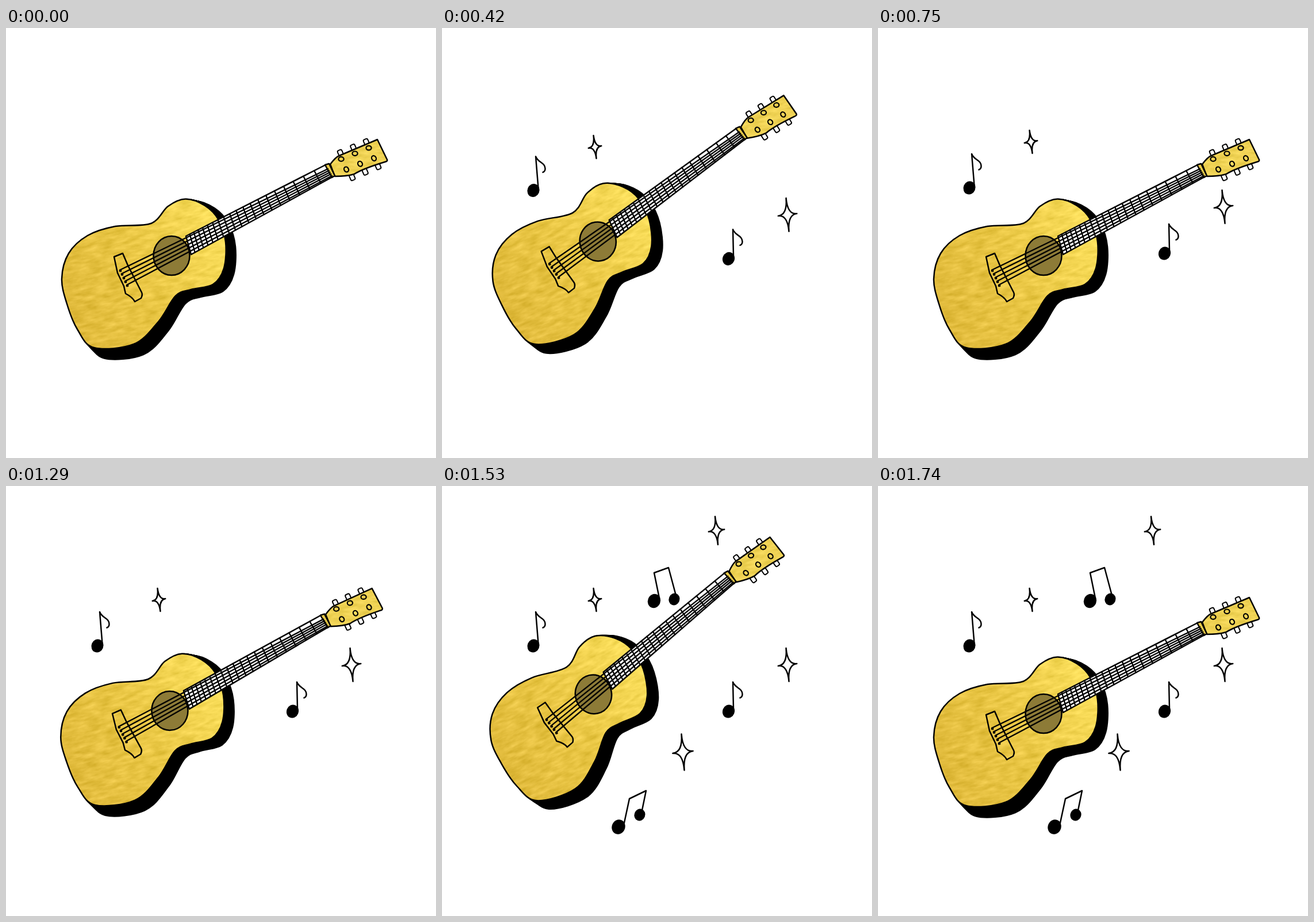
These frames come from a looping animation (748x748 px, 2280 ms). An HTML page:

```html
<!DOCTYPE html>
<html lang="en">
<head>
<meta charset="utf-8">
<title>Guitar</title>
<style>
  html, body { margin: 0; width: 100%; height: 100%; overflow: hidden; background: #fff; }
  svg { display: block; width: 100%; height: 100%; }
  .line { fill: none; stroke: #000; stroke-width: 2.5; stroke-linecap: round; stroke-linejoin: round; }
</style>
</head>
<body>
<svg viewBox="0 0 748 748">
  <defs>
    <linearGradient id="gold" x1="0" y1=".6" x2="1" y2=".4">
      <stop offset="0" stop-color="#e0b93b"/>
      <stop offset=".5" stop-color="#eac745"/>
      <stop offset="1" stop-color="#fbe05c"/>
    </linearGradient>
    <filter id="foil" x="0" y="0" width="1" height="1" color-interpolation-filters="sRGB">
      <feTurbulence type="fractalNoise" baseFrequency=".04 .14" numOctaves="4" seed="4"/>
      <feColorMatrix values=".8 0 0 0 .1  .8 0 0 0 .1  1 0 0 0 0  0 0 0 0 1"/>
      <feComposite in="SourceGraphic" operator="arithmetic" k2="1" k3=".22" k4="-.11"/>
    </filter>
    <path id="body"/>
    <path id="head" d="M564 237Q574 224 580 222L646 194L663 229Q664 232 659 233Q620 245 606 254Q594 258 572 258Z"/>
    <clipPath id="bodyClip"><use href="#body"/></clipPath>
    <clipPath id="headClip"><use href="#head"/></clipPath>
  </defs>

  <g id="guitar" class="line">
    <g id="shadow" fill="#000"></g>
    <g clip-path="url(#bodyClip)">
      <rect x="75" y="275" width="330" height="305" fill="url(#gold)" stroke="none"
        filter="url(#foil)" transform="rotate(-12 240 428)"/>
    </g>
    <use href="#body"/>
    <g id="buttons" fill="#fff" stroke-width="2"></g>
    <g clip-path="url(#headClip)">
      <rect x="555" y="185" width="115" height="80" fill="#f0d355" stroke="none" filter="url(#foil)"/>
    </g>
    <use href="#head"/>
    <g id="posts" stroke-width="2.2"></g>
    <path fill="#fff" d="M313 362L556 238L568 259L322 394Z"/>
    <path id="frets" stroke-width="2.3"/>
    <path fill="#e9cb4a" d="M555 238L562 236L572 257L567 260Z"/>
    <ellipse cx="288" cy="396" rx="31.5" ry="34" fill="#8d7b37"/>
    <path d="M188 398L203 392L212 413L236 460Q238 464 235 470L224 476Q220 468 208 462L205 449L194 426Z"/>
    <path id="strings" stroke-width="2.4"/>
  </g>
  <g id="symbols" class="line"></g>
</svg>
<script>
const $ = id => document.getElementById(id);
const mix = (a, b, u) => a + (b - a) * u;
const repeat = (count, make) => Array.from({ length: count }, (_, i) => make(i)).join("");
const stroke = d => `<path d="${d}"/>`;

// Closed Catmull-Rom curve through the points.
function smooth(points) {
  const at = i => points[(i + points.length) % points.length];
  const handle = (i, side) => at(i).map((v, axis) => v + side * (at(i + 1)[axis] - at(i - 1)[axis]) / 6);
  return `M${at(0)}` + repeat(points.length, i => `C${handle(i, 1)} ${handle(i + 1, -1)} ${at(i + 1)}`) + "Z";
}

$("body").setAttribute("d", smooth([
  [312, 297.5], [346, 309], [370, 334], [382, 372], [379, 418], [360, 446], [322, 455], [295, 466],
  [265, 511], [222, 550], [153, 556], [124, 524], [106, 480], [97, 436], [109, 392], [142, 361],
  [190, 345], [252, 340], [282, 310]
]));

// The shadow is the body swept to the lower right, growing downwards.
$("shadow").innerHTML = repeat(8, i => {
  const u = (i + 1) / 8, grow = 0.055 * u;
  return `<use href="#body" transform="matrix(1 0 0 ${1 + grow} ${17 * u} ${4 * u - 297 * grow})"/>`;
});

// Frets follow the equal-tempered spacing between nut and bridge.
$("frets").setAttribute("d", repeat(19, i => {
  const u = 1.46 * (1 - 2 ** (-(i + 1) / 12));
  return `M${mix(556, 313, u)} ${mix(238, 362, u)}L${mix(568, 322, u)} ${mix(259, 394, u)}`;
}));

// Each string starts with a short thick pin at the bridge.
$("strings").setAttribute("d", repeat(5, i => {
  const u = i / 4, x = mix(199, 211, u), y = mix(422, 448, u);
  return `M${x} ${y}m-1 -1h2v2h-2zL${mix(560, 567, u)} ${mix(245, 257, u)}`;
}));

// Tuners sit in two rows of three along the headstock.
$("buttons").innerHTML = repeat(6, i => {
  const low = i % 2, column = i >> 1;
  const x = 582 + 20 * low + 22.5 * column, y = 218 + 41 * low - 9.5 * column;
  return `<rect x="${x - 4}" y="${y - 6}" width="8" height="12" rx="2.5" transform="rotate(-23 ${x} ${y})"/>`;
});
$("posts").innerHTML = repeat(6, i => {
  const low = i % 2, column = i >> 1;
  const x = 583 + 9 * low + 24 * column, y = 228 + 18 * low - 9.7 * column;
  return `<ellipse cx="${x}" cy="${y}" rx="4.6" ry="3.8" transform="rotate(${60 * low} ${x} ${y})"/>`;
});

const noteHead = (x, y, r) =>
  `<ellipse cx="${x}" cy="${y}" rx="${r}" ry="${r * 1.12}" fill="#000" stroke="none" transform="rotate(22 ${x} ${y})"/>`;

const note = (x, y, lean, height) => noteHead(x, y, 10.4) +
  stroke(`M${x + 8.5} ${y - 4}L${x + lean} ${y - height}c4 11 16 10 16.5 21q0 5 -4 6.5`);

const pair = (x1, y1, r1, x2, y2, r2, beam) => noteHead(x1, y1, r1) + noteHead(x2, y2, r2) +
  stroke(`M${x1 + r1 - 2} ${y1 - 5}L${beam}L${x2 + r2 - 6} ${y2 - 5}`);

function sparkle(x, y, height) {
  const h = height / 2, w = h * 0.56, pull = `Q${x} ${y} `;
  return stroke(`M${x - 2.5} ${y - h}${pull}${x + w} ${y - 2}${pull}${x + 2.5} ${y + h}${pull}${x - w} ${y + 2}${pull}${x - 2.5} ${y - h}Z`);
}

// Each symbol: swing that reveals it, rise distance, artwork.
const symbols = [
  [0, 12, note(159, 278, 4, 59)],
  [0, 24, sparkle(266, 198, 40)],
  [0, 25, note(498.5, 392, 7.5, 51)],
  [0, 37, sparkle(601, 311, 58)],
  [1, 25, pair(369, 200, 11, 404, 197, 9.4, "369 151L394 142")],
  [1, 25, sparkle(477.5, 77.5, 49)],
  [1, 37, sparkle(419, 463, 63)],
  [1, 50, pair(307, 593, 11.5, 344, 572, 9.4, "326 544L355 530")]
].map(([swing, rise, art]) => {
  const node = document.createElementNS("http://www.w3.org/2000/svg", "g");
  node.innerHTML = art;
  $("symbols").append(node);
  return { swing, rise, node };
});

const LOOP = 2280, STEP = 30, HALF = 8;
const SWING_STARTS = [270, 1260];

function draw(now) {
  const t = now % LOOP;
  const steps = SWING_STARTS.map(start =>
    Math.max(0, Math.min(2 * HALF, Math.floor((t - start) / STEP))));
  const tilt = steps.reduce((sum, k) => sum + HALF - Math.abs(k - HALF), 0) * 1.75;
  $("guitar").setAttribute("transform", `rotate(${-tilt} 119 493.5)`);
  for (const { swing, rise, node } of symbols) {
    const progress = Math.min(1, steps[swing] / HALF);
    node.setAttribute("visibility", progress >= 0.5 ? "visible" : "hidden");
    node.setAttribute("transform", `translate(0 ${rise * (1 - progress)})`);
  }
  requestAnimationFrame(draw);
}
draw(performance.now());
</script>
</body>
</html>
```
